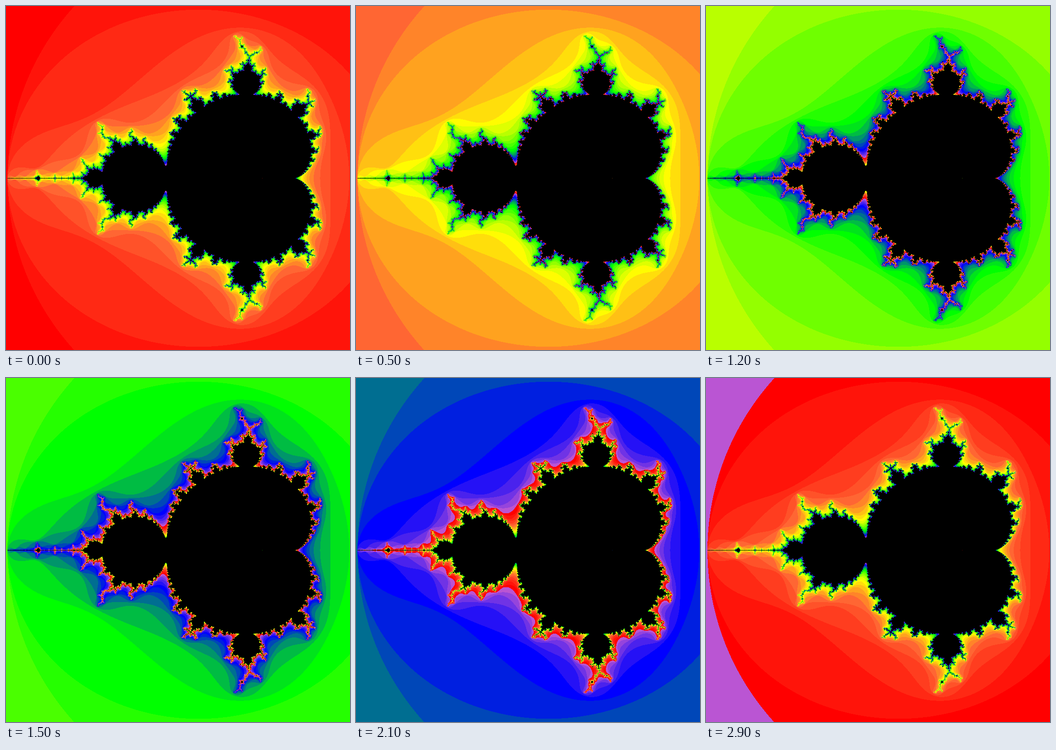
Write an HTML page with a canvas that moves like this. It is 720 px wide and 720 px high and loops after 3 s.

```html
<!DOCTYPE html>
<html lang="en">
<head>
<meta charset="utf-8">
<title>Mandelbrot colour cycle</title>
<style>
  html, body { margin: 0; width: 100%; height: 100%; overflow: hidden; background: #000; }
  canvas { display: block; width: 720px; height: 720px; }
</style>
</head>
<body>
<canvas id="view" width="720" height="720"></canvas>
<script>
const SIZE = 720, COLORS = 30, STEP = 100;
const SCALE = 2.7 / SIZE, OX = 536, OY = 360;
const INSIDE = COLORS, ORIGIN = COLORS + 1;

// palette position, r, g, b
const stops = [
  [0, 255, 0, 0],
  [5, 255, 102, 51],
  [10.1, 255, 255, 0],
  [17, 0, 255, 0],
  [17.3, 0, 255, 0],
  [23.8, 0, 0, 255],
  [24, 0, 0, 255],
  [29, 186, 85, 211]
];

function colorAt(p) {
  let i = 0;
  while (i < stops.length - 2 && p > stops[i + 1][0]) i++;
  const a = stops[i], b = stops[i + 1];
  const t = (p - a[0]) / (b[0] - a[0]);
  return [1, 2, 3].map(j => Math.round(a[j] + (b[j] - a[j]) * t));
}

const palette = Array.from({ length: COLORS }, (_, i) => colorAt(i));

// Number of steps before z leaves the disc of radius 2
function escapeTime(cx, cy) {
  let x = cx, y = cy;
  for (let n = 0; n < COLORS; n++) {
    const xx = x * x, yy = y * y;
    if (xx + yy > 4) return n;
    y = 2 * x * y + cy;
    x = xx - yy + cx;
  }
  return INSIDE;
}

const field = new Uint8Array(SIZE * SIZE);
for (let py = 0; py < SIZE; py++) {
  for (let px = 0; px < SIZE; px++) {
    field[py * SIZE + px] = escapeTime((px - OX) * SCALE, (py - OY) * SCALE);
  }
}
field[OY * SIZE + OX] = ORIGIN;

const ctx = document.getElementById("view").getContext("2d");
const image = ctx.createImageData(SIZE, SIZE);
const pixels = new Uint32Array(image.data.buffer);
const pack = ([r, g, b]) => (255 << 24 | b << 16 | g << 8 | r) >>> 0;

function draw(shift) {
  const lut = palette.map((_, n) => pack(palette[(n + shift) % COLORS]));
  lut[INSIDE] = pack([0, 0, 0]);
  lut[ORIGIN] = pack(palette[(shift + 1) % COLORS].map(v => v * 0.4));
  for (let i = 0; i < pixels.length; i++) pixels[i] = lut[field[i]];
  ctx.putImageData(image, 0, 0);
}

let shown = 0;
draw(0);
const start = performance.now();

function tick() {
  const elapsed = Math.max(0, performance.now() - start);
  const shift = Math.floor(elapsed / STEP) % COLORS;
  if (shift !== shown) draw(shown = shift);
  requestAnimationFrame(tick);
}
requestAnimationFrame(tick);
</script>
</body>
</html>
```
